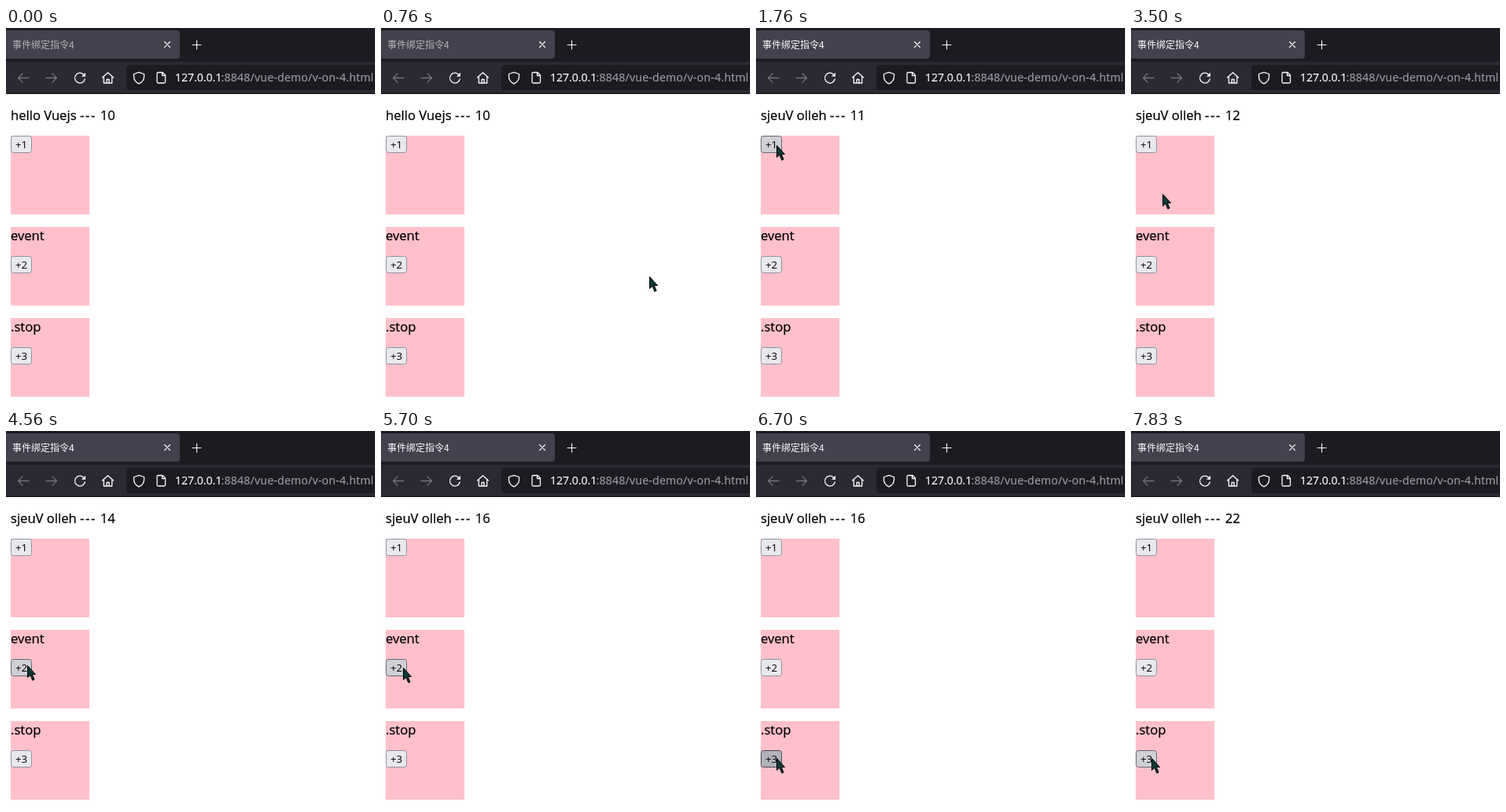
These frames come from a looping animation (469 px wide and 477 px high, 8 s). An HTML page:

```html
<!DOCTYPE html>
<html lang="zh">
<head>
<meta charset="utf-8">
<title>v-on</title>
<style>
html, body { margin: 0; width: 100%; height: 100%; overflow: hidden; background: #fff; }
svg { display: block; width: 100%; height: 100%; }
text { font-family: "Open Sans", "Noto Sans", sans-serif; white-space: pre; }
.page { font-size: 16.6px; fill: #000; stroke: #000; stroke-width: .25; }
.label { font-size: 13.33px; text-anchor: middle; fill: #000; }
.title { font: 12px "Noto Sans CJK SC", "Noto Sans CJK", "Noto Sans CJK JP", sans-serif; }
.url { font-size: 14px; fill: #fbfbfe; stroke: #fbfbfe; stroke-width: .2; }
.path { fill: #9d9ca4; stroke: #9d9ca4; letter-spacing: .27px; }
.icon { fill: none; stroke: #fbfbfe; stroke-width: 1.3; stroke-linecap: round; stroke-linejoin: round; }
.thin { stroke-width: 1.1; }
.off { stroke: #74737c; }
</style>
</head>
<body>
<svg viewBox="0 0 469 477">
  <rect width="469" height="477" fill="#fff"/>

  <rect width="469" height="43" fill="#1c1b22"/>
  <rect x="-5" y="3" width="226" height="36" rx="4" fill="#42414d"/>
  <text id="title" class="title" x="8" y="25.5">事件绑定指令4</text>
  <path class="icon thin" d="M201.5 17.5l7 7m0-7l-7 7"/>
  <path class="icon thin" d="M237 21.5h11M242.5 16v11"/>

  <rect y="43" width="469" height="41" fill="#2b2a33"/>
  <rect y="83" width="469" height="1" fill="#0c0c0d"/>
  <rect x="153" y="47" width="330" height="32" rx="4" fill="#1c1b22"/>
  <path class="icon off" d="M29 63.5H15.5m5.5-5.5l-5.5 5.5 5.5 5.5"/>
  <path class="icon off" d="M51 63.5h13.5m-5.5-5.5l5.5 5.5-5.5 5.5"/>
  <path class="icon" d="M100.2 65a6.4 6.4 0 1 1-1.6-5.8l1.6 1.6"/>
  <path d="M101 56.8v5h-5z" fill="#fbfbfe"/>
  <path class="icon" d="M122.5 63l7-6.3 7 6.3M124.3 62v8h10.4v-8M128 70v-4.5h3V70"/>
  <path class="icon" d="M169 56.3l6.5 2.2v3.2c0 4.2-2.4 7.3-6.5 9.2-4.1-1.9-6.5-5-6.5-9.2v-3.2z"/>
  <path class="icon" d="M193.5 56.5h5.5l3.5 3.5v8.5a1.5 1.5 0 0 1-1.5 1.5h-7.5a1.5 1.5 0 0 1-1.5-1.5V58a1.5 1.5 0 0 1 1.5-1.5zM198.5 56.8v3.7h3.7"/>
  <text class="url" x="215" y="68">127.0.0.1<tspan class="path" x="273.5">:8848/vue-demo/v-on-4.html</tspan></text>

  <text class="page" y="117"><tspan id="msg" x="6"></tspan><tspan x="94" letter-spacing="1.6">---</tspan><tspan id="count" x="119.7"></tspan></text>
  <g id="boxes"></g>
  <path id="cursor" d="M.5.5V15.500L4 12.300 6.800 19.200 9 18.200 6.300 11.500H10.500Z" fill="#0a3a34" stroke="#000"/>
</svg>
<script>
const LOOP = 8000, TICK = 100 / 3, ENTER = 500;
const $ = id => document.getElementById(id);
const smooth = u => u * u * (3 - 2 * u);
const easeOut = u => 1 - (1 - u) ** 2;

// Each move leads on from the last; bow bends it sideways.
const origin = { x: 421, y: 411 };
const moves = [
  { from: ENTER, to: 1300, x: 33, y: 149, ease: smooth, bowY: -69 },
  { from: 1300, to: 1500, x: 26, y: 149, ease: easeOut },
  { from: 3367, to: 3930, x: 29, y: 297, ease: easeOut, bowX: 13 },
  { from: 4100, to: 4130, x: 27, y: 298, ease: smooth },
  { from: 5667, to: 6000, x: 63, y: 422, ease: smooth },
  { from: 6000, to: 6330, x: 26, y: 416, ease: smooth }
];

// Mouse down and up; every button is clicked twice in turn.
const clicks = [
  [1730, 1760], [3000, 3100], [4430, 4560],
  [5200, 5300], [6700, 6800], [7760, 7830]
].map(([down, up], i) => ({ down, up, add: 1 + Math.floor(i / 2) }));

const boxes = ['', 'event', '.stop'].map((text, i) => {
  const top = 137 + 116 * i;
  return { text, top, button: text ? top + 37 : top };
});

$('boxes').innerHTML = boxes.map((b, i) => `
  <rect x="6" y="${b.top}" width="100" height="100" fill="#ffc0cb"/>
  <text class="page" x="6" y="${b.top + 17}">${b.text}</text>
  <rect class="button" x="6.5" y="${b.button + 0.5}" width="26" height="21" rx="3"/>
  <text class="label" x="19.5" y="${b.button + 16}">+${i + 1}</text>`).join('');
const buttons = document.querySelectorAll('.button');

function pointer(t) {
  const time = Math.floor((t + 5) / TICK) * TICK;
  let { x, y } = origin;
  for (const m of moves) {
    if (time <= m.from) break;
    const p = m.ease(Math.min(1, (time - m.from) / (m.to - m.from)));
    const bend = Math.sin(Math.PI * p);
    x += (m.x - x) * p + (m.bowX || 0) * bend;
    y += (m.y - y) * p + (m.bowY || 0) * bend;
  }
  return [Math.round(x), Math.round(y)];
}

function buttonColors(hover, pressed) {
  if (!hover) return ['#e9e9ed', '#8f8f9d'];
  return pressed ? ['#b1b1b9', '#484851'] : ['#d0d0d7', '#676774'];
}

function draw(t) {
  const [x, y] = pointer(t);
  const shown = t >= ENTER;
  const pressed = clicks.some(c => t >= c.down && t < c.up);
  const done = clicks.filter(c => t >= c.up);

  boxes.forEach((b, i) => {
    const hover = shown && x >= 6 && x < 33 && y >= b.button && y < b.button + 22;
    const [fill, stroke] = buttonColors(hover, pressed);
    buttons[i].setAttribute('fill', fill);
    buttons[i].setAttribute('stroke', stroke);
  });

  $('msg').textContent = done.length ? 'sjeuV olleh' : 'hello Vuejs';
  $('count').textContent = done.reduce((sum, c) => sum + c.add, 10);
  $('title').setAttribute('fill', t >= clicks[0].down ? '#fbfbfe' : '#b5b4bb');
  $('cursor').setAttribute('visibility', shown ? 'visible' : 'hidden');
  $('cursor').setAttribute('transform', `translate(${x} ${y})`);
}

const start = performance.now();
function frame() {
  draw((performance.now() - start) % LOOP);
  requestAnimationFrame(frame);
}
frame();
</script>
</body>
</html>
```
